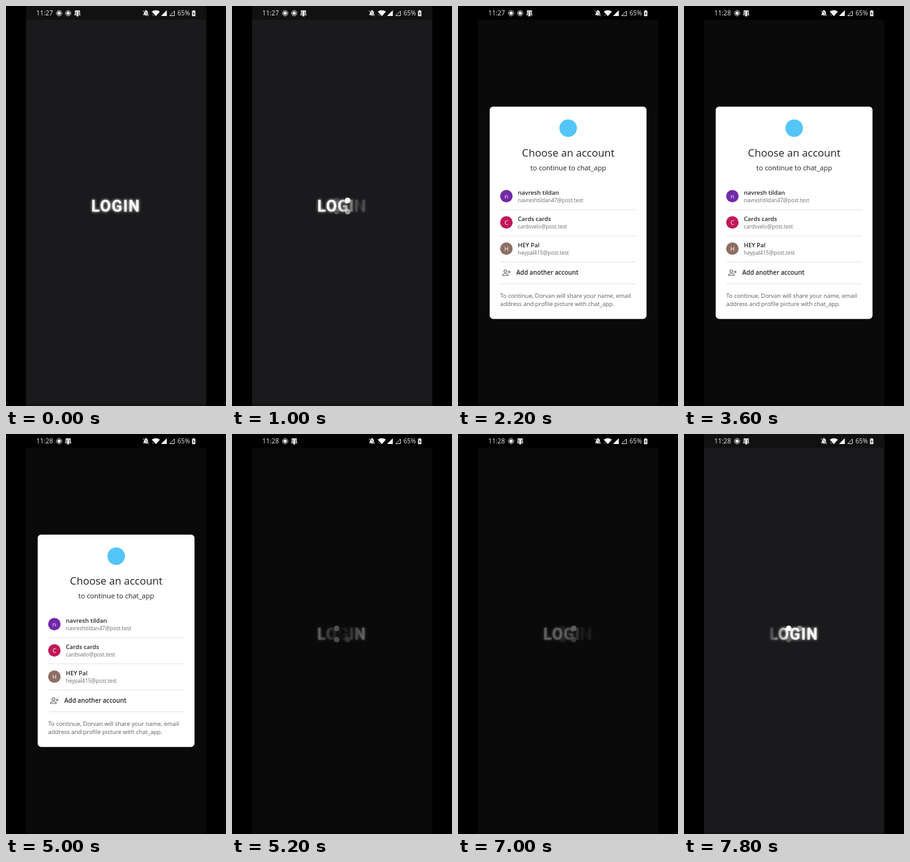
These frames come from a looping animation (352 px wide and 640 px high, 8000 ms). An HTML page with a canvas:

```html
<!DOCTYPE html>
<html lang="en">
<head>
<meta charset="utf-8">
<title>Login flow</title>
<style>
html, body { margin: 0; width: 100%; height: 100%; overflow: hidden; background: #000; }
canvas { display: block; width: 352px; height: 640px; }
</style>
</head>
<body>
<canvas id="stage" width="352" height="640"></canvas>
<script>
const LOOP = 8000, STEP = 200, TAU = Math.PI * 2;
const SANS = '"Open Sans", "Noto Sans", sans-serif';
const ctx = document.getElementById('stage').getContext('2d');
const layer = Object.assign(document.createElement('canvas'), { width: 352, height: 640 });
const lx = layer.getContext('2d');

const ACCOUNTS = [
  ['navresh tildan', 'navreshtildan47@post.test', 'n', '#7229a8'],
  ['Cards cards', 'cardsvelo@post.test', 'C', '#c2185b'],
  ['HEY Pal', 'heypal415@post.test', 'H', '#8d6e63']
];

const ramp = (t, from, to) => Math.min(1, Math.max(0, (t - from) / (to - from)));

function rect(x, y, w, h, color) {
  ctx.fillStyle = color;
  ctx.fillRect(x, y, w, h);
}

function disc(x, y, r, color) {
  ctx.fillStyle = color;
  ctx.beginPath();
  ctx.arc(x, y, r, 0, TAU);
  ctx.fill();
}

function ring(x, y, r, width, color) {
  ctx.strokeStyle = color;
  ctx.lineWidth = width;
  ctx.beginPath();
  ctx.arc(x, y, r, 0, TAU);
  ctx.stroke();
}

function path(d, color, width) {
  const p = new Path2D(d);
  if (width) {
    ctx.strokeStyle = color;
    ctx.lineWidth = width;
    ctx.stroke(p);
  } else {
    ctx.fillStyle = color;
    ctx.fill(p);
  }
}

function text(str, x, y, size, color, weight = 400, align = 'left') {
  ctx.font = `${weight} ${size}px ${SANS}`;
  ctx.textAlign = align;
  ctx.fillStyle = color;
  ctx.fillText(str, x, y);
}

// Glowing word with a dark band sweeping to the right.
function login(t) {
  const w = 76, mid = 100 + 2 * w * ((t + 30) / 1500 % 1);
  lx.globalCompositeOperation = 'source-over';
  lx.clearRect(0, 0, 352, 640);
  lx.font = '700 25px Roboto, sans-serif';
  lx.letterSpacing = '1.25px';
  lx.fillStyle = lx.shadowColor = '#fff';
  lx.shadowBlur = 4;
  lx.fillText('LOGIN', 136.6, 328.5);
  lx.shadowBlur = 0;
  const g = lx.createLinearGradient(mid - 1.5 * w, 313, mid + 1.5 * w, 327);
  g.addColorStop(0.35, '#fff');
  g.addColorStop(0.5, '#28282b');
  g.addColorStop(0.65, '#fff');
  lx.globalCompositeOperation = 'source-in';
  lx.fillStyle = g;
  lx.fillRect(0, 0, 352, 640);
  ctx.drawImage(layer, 0, 0);
}

// Four dots fading one after another, clockwise from bottom right.
function spinner(t) {
  const phase = (t - 984) / 1200;
  [[1, 1, 0], [-1, 1, 0.9], [-1, -1, 0.6], [1, -1, 0.3]].forEach(([dx, dy, delay]) => {
    ctx.globalAlpha = (Math.sin((phase + delay) * TAU) + 1) / 2;
    disc(176.3 + 8.8 * dx, 320 + 9 * dy, 4.5, '#fff');
  });
  ctx.globalAlpha = 1;
}

function record(x) {
  ring(x, 11.5, 4.3, 1, '#ddd');
  disc(x, 11.5, 2.7, '#fff');
}

function statusBar(t) {
  const late = t >= 3000;
  text(t < 3600 ? '11:27' : '11:28', 48.6, 15.2, 10.4, '#eee');
  record(85);
  if (!late) record(99.5);

  ctx.save();
  ctx.translate(late ? 99.5 : 114.3, 11.5);
  path('M-4-4.5H4V2H5V3.2H2.6V-2.8H-2.6V3.2H-5V2H-4Z', '#eee');
  path('M-1.8-2.8H1.8V5H-1.8Z', '#eee');
  ctx.restore();

  path('M219.5 14.5V13.5L220.8 12.3V10Q221 7.8 223 7.3V6.5H224.6V7.3Q227 8 227 10.3V12.3L228.3 13.5V14.5ZM222.6 15H225Q224 16.8 222.6 15Z', '#eee');
  path('M220 6.8L229 15.8', '#111', 0.8);
  path('M219 7.3L228 16.3', '#eee', 1);
  path('M239.7 16.3L233.2 9Q239.7 4.4 246.2 9Z', '#fff');
  path('M234.5 13.5L236 15.5', '#ccc', 1);
  path('M257.3 6.8V16H248Z', '#fff');
  path('M269.5 7.9V15.5H261.9Z', '#ddd', 1);
  text('65%', 274.6, 15.2, 10, '#eee');
  path('M299 6.7H301.6V7.8H303V16.2H297.6V7.8H299Z', '#eee');
  path('M300.7 9L298.8 12.4H300V15L301.9 11.6H300.7Z', '#222');
}

function dialog() {
  ctx.fillStyle = '#fff';
  ctx.beginPath();
  ctx.roundRect(50.7, 161, 250.9, 339.7, 5.5);
  ctx.fill();

  disc(176.3, 195.5, 14, '#54c5f8');
  text('Choose an account', 176.4, 241, 16.7, '#202124', 400, 'center');
  text('to continue to chat_app', 176.4, 263, 11, '#202124', 400, 'center');

  ACCOUNTS.forEach(([name, mail, initial, color], i) => {
    const y = 304.2 + 42 * i;
    disc(77.4, y, 10, color);
    text(initial, 77.4, y + 3.4, 9.5, '#fff', 400, 'center');
    text(name, 95.8, y - 2, 9.5, '#222428', 600);
    text(mail, 95.8, y + 9.9, 8.4, '#6a6d72');
    rect(68, 325.4 + 41.9 * i, 217, 1, '#e2e3e5');
  });

  ring(75.8, 424.2, 2.2, 1.1, '#5f6368');
  path('M71.3 431.2V430Q72 428.2 75.8 428.2T80.3 430V431.2Z', '#5f6368', 1.1);
  path('M81.8 423V428M79.3 425.5H84.3', '#5f6368', 1.1);
  text('Add another account', 93.3, 430.2, 9.8, '#222428', 600);
  rect(68, 444, 217, 1, '#e2e3e5');
  text('To continue, Dorvan will share your name, email', 67.6, 467.2, 9.35, '#585b60');
  text('address and profile picture with chat_app.', 67.6, 480.2, 9.35, '#585b60');
}

function draw(t) {
  const dim = ramp(t, 1300, 1500) - ramp(t, 7300, 7500);

  rect(0, 0, 352, 640, '#000');
  rect(32, 0, 288.5, 640, '#1a1a1c');
  rect(32, 636, 288.5, 4, '#151517');
  login(t);
  if (t >= 984) spinner(t);
  rect(32, 0, 289, 640, `rgba(0,0,0,${0.63 * dim})`);

  const bar = Math.round(17 * (1 - dim));
  rect(32, 0, 288.5, 22, `rgb(${bar},${bar},${bar + 1})`);
  statusBar(t);
  if (t >= 2000 && t < 5200) dialog();
}

const start = performance.now();
function tick() {
  const t = (performance.now() - start) % LOOP;
  draw(Math.floor(t / STEP) * STEP);
  requestAnimationFrame(tick);
}
tick();
</script>
</body>
</html>
```
